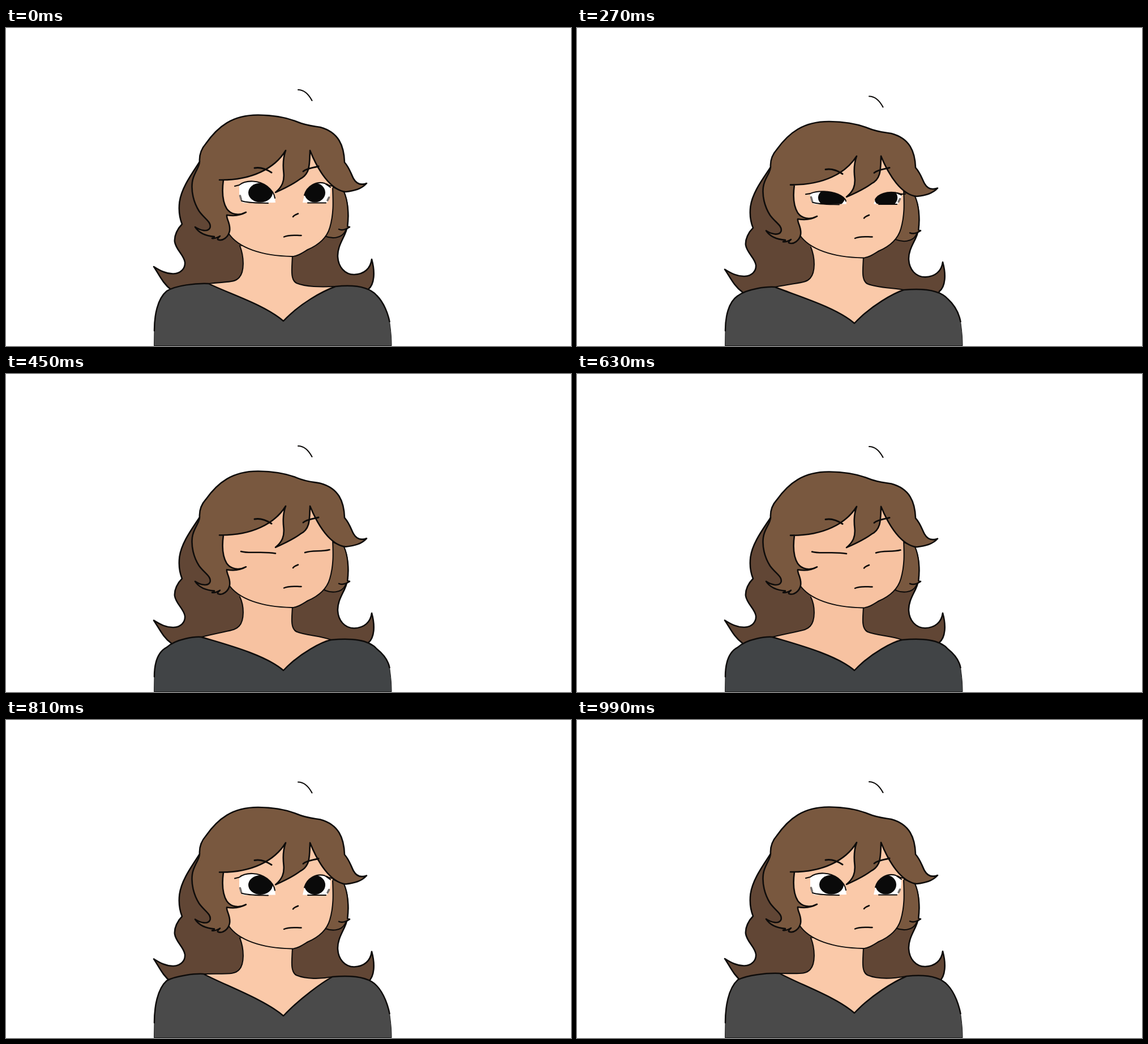
Animation, 998 px wide and 561 px high, one loop 1.08 s. Source, as an HTML page:

```html
<!DOCTYPE html>
<html lang="en">
<head>
<meta charset="utf-8">
<title>Blink</title>
<style>
  html, body { margin: 0; width: 100%; height: 100%; overflow: hidden; background: #fff; }
  svg { display: block; width: 100%; height: 100%; }
  .ink { fill: none; stroke: #0e0c0b; stroke-width: 2.5; stroke-linecap: round; stroke-linejoin: round; }
  .edge { stroke: #0e0c0b; stroke-width: 2.6; stroke-linejoin: round; }
  .fine { stroke-width: 2.1; }
  .brow { stroke-width: 2.9; }
  .back { fill: #614635; }
  .front { fill: #79583f; }
  .skin { fill: var(--skin); }
  .cloth { fill: var(--cloth); }
  .shade { fill: none; stroke: #77706c; stroke-width: 3.5; stroke-linecap: round; }
</style>
</head>
<body>
<svg id="stage" viewBox="0 0 998 561" preserveAspectRatio="none">
  <defs>
    <clipPath id="clipL"><path id="openL"/></clipPath>
    <clipPath id="clipR"><path id="openR"/></clipPath>
  </defs>

  <g class="hair">
    <path class="back edge" d="M342 236C330 255 310 281 306.500 307C304.500 324 307 336 311 346C303 354 297 366 298 377C300 391 314 400 316 413C317 424 309 433 296 433.500C283 434 272 428 261 421C270 434 277 451 292 462L300 476H635L640 461C651 452 652 430 646 408C644 424 633 434.500 615 435C598 435 587 421 586 404C585 389 593 376 598 365C601 359 602 354 603 350C606 330 604 307 597 290L560 220H380Z"/>
  </g>

  <path id="neck" class="skin"/>
  <path id="neckLine" class="ink fine"/>
  <path id="shirt" class="cloth" stroke="#1d1d1d" stroke-width="1"/>
  <path id="shirtLine" class="ink"/>

  <g class="hair">
    <path class="front edge fine" d="M576 280L597 289C605 307 605 330 603 350L607 351C602 354 600 355 599 359C592 372 575 372 563 367L555 340Z"/>
    <path class="ink" d="M607 351C601 355 594 358 588 355"/>
  </g>

  <g class="face">
    <path class="skin" d="M393 362C410 388 452 402 505 403C515 403 525 396 533 391C554 382 567 369 572 352C579 328 578 307 577 283L575 262L540 205H450L382 255V300L390 335Z"/>
    <path class="ink fine" d="M393 362C410 388 452 402 505 403C515 403 525 396 533 391C554 382 567 369 572 352C579 328 578 307 577 283"/>
  </g>

  <g class="face" id="eyes">
    <use href="#openL" fill="#fff"/>
    <use href="#openR" fill="#fff"/>
    <g clip-path="url(#clipL)"><ellipse id="pupilL" cx="449.500" ry="17" fill="#0a0a0a"/></g>
    <g clip-path="url(#clipR)"><ellipse id="pupilR" cx="545.500" ry="17" fill="#0a0a0a"/></g>
    <path class="shade" d="M413.500 296L415.500 303M570.500 299L568 304"/>
    <path class="ink fine" d="M416 305C428 309 445 308.500 463 309M533 308.500H565"/>
    <path id="lids" class="ink fine"/>
  </g>
  <g class="face" id="shut">
    <path class="ink" d="M415 304C430 308.500 452 303 476 307.500M528 306C541 301.500 557 305 571.500 301"/>
  </g>

  <g class="hair">
    <path class="front edge" d="M342 236C341 222 346 212 353 204C374 174 400 153 446 153.500C477 154 498 159 513 165C532 173 545 173 555 175C588 184 597 208 598 237C607 247 610 259 614 266C619 275 626 278 637 274C628 284 616 287 600 289C573 286 551 251 537 216C536 238 538 257 520 266C508 275 492 283 476 290C488 280 492 270 490.500 255C489 242 489 230 494 216C475 247 435 269 377 268L384 268C381 290 382 306 390 319C397 329 411 332 424 325C414 331 402 332 390 330C389 337 397 345 395 358C393 369 382 377 374 373C373 371 376 369 378 367C373 370 369 372 364 371C367 370 368 369 368 368C354 367 341 362 334 351C343 357 357 361 360.500 352C363 342 350 336 341 323C331 307 327 288 329 272C331 256 341 248 342 236Z"/>
  </g>

  <g class="face">
    <path class="ink brow" d="M439 247C450 245 460 249 469 255M525 253C532 247 542 247 552 244"/>
    <path class="ink" d="M507 333C509 330 512 329 516 327.500M491 368.500C500 364 512 366 521.500 366"/>
  </g>
  <path id="mark" class="ink fine" d="M516 109C526 109 534 116 540.500 128"/>
</svg>
<script>
const STEP = 90;
// crown, hair ends, face, shoulders, collar x, collar tip y, lid closure
const poses = [
  [0, 0, 0, 0, 358, 517, 0],
  [2, 2, 0.5, 1, 356, 518, 0.02],
  [5.5, 4, 1, 3, 352, 519, 0.1],
  [11.5, 6, 2.5, 6, 350, 521, 0.42],
  [15, 10, 6, 10, 347, 522, 0.75],
  [18, 14.5, 9, 13, 345, 523, 1],
  [18.5, 14.5, 9, 13, 345, 523, 1],
  [19, 14.5, 9.5, 13, 345, 523, 1],
  [10, 8, 5, 4, 347, 523, 0.45],
  [0.5, 0.5, 0.5, -3, 349, 522, 0],
  [-5, -4, -1.5, -7, 354, 517, 0],
  [0, 0, 0, -4, 358, 517, 0]
];

const el = id => document.getElementById(id);
const each = (cls, transform) =>
  document.querySelectorAll(cls).forEach(g => g.setAttribute("transform", transform));
const setPath = (id, d) => el(id).setAttribute("d", d);
const shift = y => `translate(0 ${y})`;

function drawBody(face, s, nx, tip) {
  const rx = 582 - (358 - nx) * 0.6;
  const y = 451 + s, ry = 456 + s, bend = face * 0.5;
  const left = `M413 ${384 + face}C421 ${405 + bend} 421 ${430 + bend} 412 ${440 + bend}C404 ${449 + bend} 395 ${447 + bend} ${nx} ${y}`;
  const right = `506 ${402 + face}C505 ${425 + bend} 502 ${444 + bend} 513 ${450 + bend}C530 ${457 + bend} 555 ${457 + bend} ${rx} ${ry}`;
  setPath("neckLine", `${left}M${right}`);
  setPath("neck", `${left}L490 ${tip + 6}L${rx} ${ry}C555 ${457 + bend} 530 ${457 + bend} 513 ${450 + bend}C502 ${444 + bend} 505 ${425 + bend} 506 ${402 + face}V385H413Z`);

  const corner = 464 + s * 1.4;
  const top = `262 534C262 ${508 + s * 0.4} 267 ${478 + s} 284 ${corner}` +
    `C300 ${454 + s} 335 ${450 + s} ${nx} ${y}` +
    `C${nx + 34} ${y + 17 - s * 0.5} 457 ${tip - 29} 490 ${tip}` +
    `C520 ${tip - 32} 560 ${ry + 8 - s * 0.4} ${rx} ${ry}` +
    `C610 ${ry - 3} 640 ${ry - 1} 655 ${ry + 16}C668 ${485 + s * 0.8} 675 505 677.500 518`;
  setPath("shirtLine", `M${top}`);
  setPath("shirt", `M261.500 560.500L${top}C680 535 681 548 681 560.500Z`);
}

function drawPupil(id, rx, close) {
  el(id).setAttribute("rx", rx + close * 5);
  el(id).setAttribute("cy", 290.5 + close * 15);
}

function drawEyes(close) {
  const l = y => y + (307 - y) * close;
  const lidL = `412 ${l(277)}C425 ${l(267)} 447 ${l(269)} 461 ${l(279)}C470 ${l(286)} 474 ${l(293)} 475 ${l(300)}`;
  const lidR = `527 ${l(295)}C532 ${l(278)} 548 ${l(270)} 563 ${l(274)}L573 ${l(281)}`;
  setPath("openL", `M${lidL}L476 308L420 308.500Q412 306 412 294Z`);
  setPath("openR", `M${lidR}Q574 298 567 308L524 308Z`);
  setPath("lids", `M404 ${l(279)}L412 ${l(277)}M${lidL}M${lidR}M566 ${l(275)}Q573 ${l(280)} 580 ${l(278)}`);
  drawPupil("pupilL", 21.5, close);
  drawPupil("pupilR", 18.5, close);
  el("eyes").style.display = close < 1 ? "" : "none";
  el("shut").style.display = close < 1 ? "none" : "";
}

function draw(pose) {
  const [crown, ends, face, shoulder, nx, tip, close] = pose;
  const k = (crown - ends) / 217;
  each(".hair", `matrix(1 0 0 ${1 - k} 0 ${ends + k * 371})`);
  each(".face", shift(face));
  el("mark").setAttribute("transform", shift(crown));
  drawBody(face, shoulder, nx, tip);
  drawEyes(close);
  const style = el("stage").style;
  style.setProperty("--skin", close < 1 ? "#fac9a9" : "#f7c2a1");
  style.setProperty("--cloth", close < 1 ? "#4a4a4a" : "#414446");
}

let shown = -1;
const start = performance.now();
function tick() {
  const i = Math.floor((performance.now() - start) / STEP) % poses.length;
  if (i !== shown) draw(poses[shown = i]);
  requestAnimationFrame(tick);
}
tick();
</script>
</body>
</html>
```
